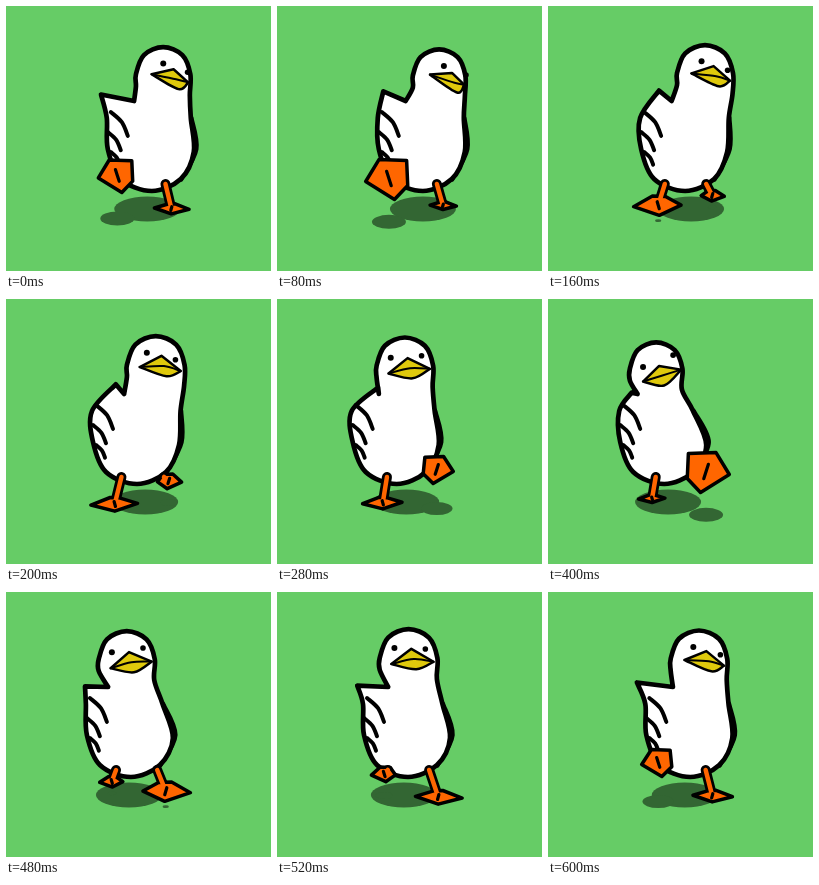
Recreate the animation shown at these times as an HTML page with a canvas. Size 265x265 px, loop 0.64 s.

```html
<!DOCTYPE html>
<html lang="en">
<head>
<meta charset="utf-8">
<title>Walking duck</title>
<style>
html, body { margin: 0; width: 100%; height: 100%; overflow: hidden; background: #66cc66; }
canvas { display: block; }
</style>
</head>
<body>
<canvas id="stage" width="265" height="265"></canvas>
<script>
const ctx = document.getElementById('stage').getContext('2d');
const LOOP = 640, STEP = 40;
const ORANGE = '#ff6600', YELLOW = '#dfc90c', SHADE = '#336633';

// Cosine that peaks at the given time, `beats` times per loop.
const wave = (t, peak, beats = 1) => Math.cos((t - peak) / LOOP * beats * 2 * Math.PI);
const mix = (a, b, k) => a + (b - a) * k;
const mid = (p, q) => [mix(p[0], q[0], .5), mix(p[1], q[1], .5)];
const smooth = u => {
  u = Math.min(1, Math.max(0, u));
  return u * u * (3 - 2 * u);
};

// Smooth curve through the points, continuing the current path.
function spline(points) {
  for (let i = 0; i < points.length - 1; i++) {
    const p = points[i], q = points[i + 1];
    const o = points[i - 1] || p, r = points[i + 2] || q;
    ctx.bezierCurveTo(
      p[0] + (q[0] - o[0]) / 6, p[1] + (q[1] - o[1]) / 6,
      q[0] - (r[0] - p[0]) / 6, q[1] - (r[1] - p[1]) / 6, ...q);
  }
}

function ink(width, color = '#000') {
  ctx.lineWidth = width;
  ctx.strokeStyle = color;
  ctx.stroke();
}

function fill(color) {
  ctx.fillStyle = color;
  ctx.fill();
}

function line(points, width, color) {
  ctx.beginPath();
  ctx.moveTo(...points[0]);
  spline(points);
  ink(width, color);
}

function oval(x, y, rx, ry, color) {
  ctx.beginPath();
  ctx.ellipse(x, y, rx, ry, 0, 0, 7);
  fill(color);
}

// One stride: swing up and forward, land, then slide back. side is -1 left, 1 right.
function footAt(t, side) {
  const p = (t + (side > 0 ? LOOP / 2 : 0)) % LOOP;
  const q = (p + 240) % LOOP;
  const lift = smooth(q / 240) * (1 - smooth((q - 320) / 110));
  const size = 17.5 + 6 * wave(p, 150);
  return {
    side, lift, size,
    height: size * (.3 + .6 * lift),
    x: 135 + side * (27 - 4 * wave(p, 60)),
    y: 201 + 4 * wave(p, 200) - 30 * lift,
    shadeY: 208 + 8 * wave(p, 100)
  };
}

function drawBody(head, r, baseX, t) {
  const at = (dx, y) => [baseX + dx, y];
  const neckR = [head[0] + r - .5, head[1] + 21], neckL = [head[0] - r, head[1] + 12];
  const chest = at(42, 146), hip = at(29, 173), shoulder = at(-45, 112);
  const waist = [(neckR[0] + chest[0]) / 2 - 1, 112];
  const tip = [95 + 16 * wave(t, 160), 89.5 - 5 * wave(t, 140)];
  const notch = [head[0] - 26 - 8 * wave(t, 120), 95];
  const dome = [0, 1, 2, 3, 4].map(i => {
    const a = Math.PI * (1 + i / 4);
    return [head[0] + r * Math.cos(a), head[1] + r * Math.sin(a)];
  });

  // Far wing peeks out behind the chest.
  line([waist, [chest[0] + 2, chest[1] - 3], hip], 5.5);

  ctx.beginPath();
  ctx.moveTo(...tip);
  ctx.lineTo(...notch);
  spline([notch, neckL, ...dome, neckR, waist, chest, hip,
    at(0, 185), at(-31, 173), at(-44, 143), shoulder, tip]);
  ctx.closePath();
  fill('#fff');
  ink(4.7);

  // Feathers get shorter down the side.
  for (let i = 0; i < 3; i++) {
    const x = shoulder[0] + 4 - 3 * (i % 2), y = 106 + 20 * i, w = 17 - 4 * i;
    line([[x, y], [x + w * .65, y + w * .6], [x + w, y + w * 1.4]], 4);
  }
}

// turn: 1 faces right, -1 left. bob: 1 is the low point of each step.
function drawFace([x, y], turn, bob) {
  const at = (dx, dy) => [x + dx, y + dy];
  oval(...at(-8 + 9 * turn + 4 * bob, -8.5 - 4 * turn + 3 * bob), 3, 3, '#000');
  oval(...at(20 + 5 * turn + 2 * bob, -7 + 6.5 * turn), 2.8, 2.8, '#000');

  const topX = 6 + 5 * turn + 2 * bob;
  const left = at(-14 + 2 * turn + 3 * bob, 5 - 7 * turn + bob);
  const right = at(25, 5 + 4 * turn);
  const top = at(topX, -6 + 3.5 * bob), low = at(topX + 5, 14 + 3 * bob);
  ctx.beginPath();
  [left, top, right].forEach(p => ctx.lineTo(...p));
  spline([right, low, left]);
  ctx.closePath();
  fill(YELLOW);
  ink(2.5);
  line([left, mid(top, low), right], 2);
}

function drawLeg({ side, lift, size, height, x, y }, baseX) {
  const at = (u, v) => [x - side * u * size, y + v * height];
  const heel = at(mix(-.2, -.45, lift), -.95), sole = at(mix(0, .25, lift), 1.05);
  const corners = [
    at(-1.05, .15), heel, at(mix(.2, .8, lift), -.9),
    at(mix(1, .85, lift), mix(-.1, .35, lift)), sole
  ];
  const leg = [[mix(x, baseX, .3 * (1 - lift)), 178], [x, y]];
  const slit = [(sole[0] - heel[0]) * .15, (sole[1] - heel[1]) * .18];

  if (lift < .6) line(leg, 10);
  ctx.beginPath();
  corners.forEach(p => ctx.lineTo(...p));
  ctx.closePath();
  fill(ORANGE);
  ink(3.5);
  if (lift < .6) line(leg, 4.5, ORANGE);
  line([[x - slit[0], y - slit[1]], [x + slit[0], y + slit[1]]], 3.2);
}

function draw() {
  const t = Math.floor(performance.now() % LOOP / STEP) * STEP;
  const turn = wave(t, 70), bob = wave(t, 65, 2);
  const head = [138 + 27 * wave(t, 75) - 3 * bob, 67.7 + 2 * bob];
  const baseX = 131 + 16 * wave(t, 40);
  const feet = [footAt(t, 1), footAt(t, -1)];

  ctx.fillStyle = '#66cc66';
  ctx.fillRect(0, 0, 265, 265);
  ctx.lineJoin = ctx.lineCap = 'round';
  oval(133 + 13 * wave(t, 90), 203, 33, 12.5, SHADE);
  for (const f of feet) oval(f.x, f.shadeY, 17 * f.lift, 7 * f.lift, SHADE);
  drawBody(head, 27.6 - 1.4 * bob, baseX, t);
  drawFace(head, turn, bob);
  for (const f of feet) drawLeg(f, baseX);
  requestAnimationFrame(draw);
}
draw();
</script>
</body>
</html>
```
